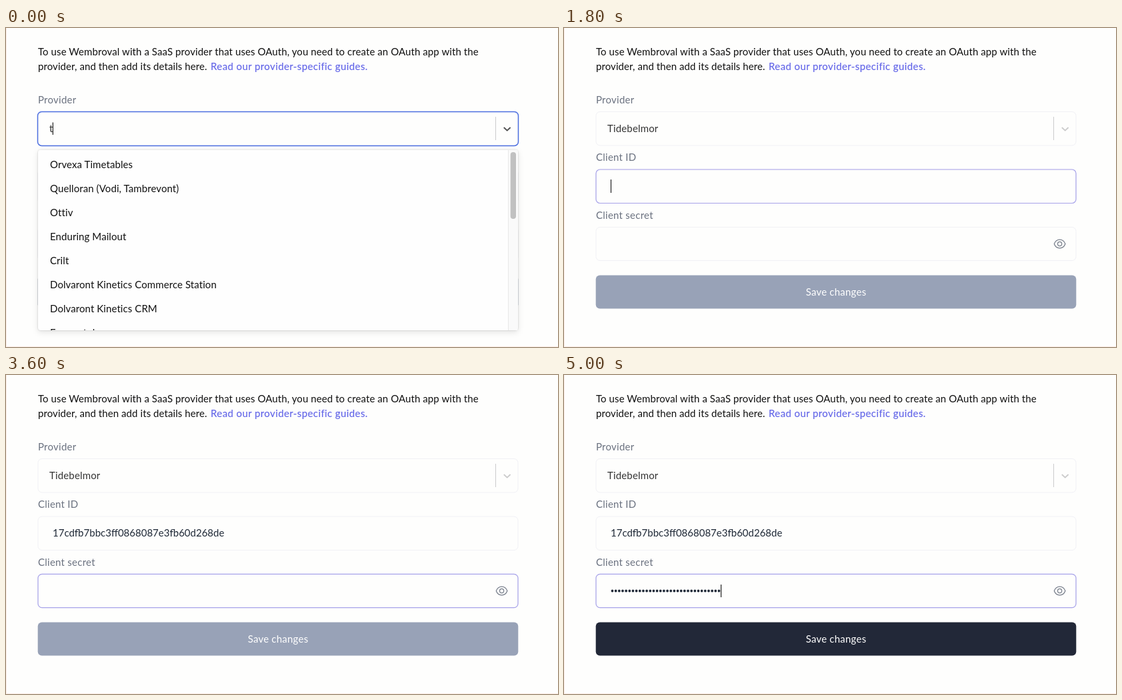
These frames come from a looping animation (828x478 px, 5.2 s). An HTML page:

```html
<!DOCTYPE html>
<html lang="en">
<head>
<meta charset="utf-8">
<title>OAuth app form</title>
<style>
html, body { margin: 0; width: 100%; height: 100%; overflow: hidden; background: #fefefd; }
svg { display: block; width: 828px; height: 478px; }
text { font: 15px Lato, "Open Sans", sans-serif; letter-spacing: .08px; fill: #111; }
.label { fill: #6b7280; letter-spacing: .25px; }
.link { fill: #6366e8; stroke: #6366e8; stroke-width: .15px; letter-spacing: .4px; }
.value { fill: #333; letter-spacing: .15px; }
.id { fill: #1f2937; letter-spacing: 0; }
.save { fill: #fff; letter-spacing: .22px; text-anchor: middle; }
.box { fill: #fefefd; stroke: #f1f1f5; }
.ring { fill: none; stroke: #4d6fe0; stroke-width: 1.5; }
.field { fill: none; stroke: #a7a2ea; stroke-width: 1.2; }
.caret { stroke: #222; stroke-width: 1.2; }
.chevron { fill: none; stroke: #ccc; stroke-width: 1.8; stroke-linecap: round; stroke-linejoin: round; }
.dark { stroke: #555; }
.eye { fill: none; stroke: #747b88; stroke-width: 1.2; }
.menu { fill: #fefefe; filter: drop-shadow(0 0 1px rgba(0,0,0,.2)) drop-shadow(0 3px 4px rgba(0,0,0,.1)); }

/* Each part shows during one window of the 5.2 s loop. */
.typed1, .typed2, .typed3, .chosen, .on-provider, .on-id, .on-secret,
.id-caret, .pasted, .paste-caret, .marked, .secret-caret, .filled, .btn {
  animation: 5.2s step-end infinite;
}
.typed1 { animation-name: typed1; }
.typed2 { animation-name: typed2; }
.typed3 { animation-name: typed3; }
.chosen { animation-name: chosen; }
.on-provider { animation-name: on-provider; }
.on-id { animation-name: on-id; }
.on-secret { animation-name: on-secret; }
.id-caret { animation-name: id-caret; }
.pasted { animation-name: pasted; }
.paste-caret { animation-name: paste-caret; }
.marked { animation-name: marked; }
.secret-caret { animation-name: secret-caret; }
.filled { animation-name: filled; }
.btn { animation-name: btn; }

@keyframes typed1 { 0% { opacity: 1 } 3.846%, to { opacity: 0 } }
@keyframes typed2 { 0% { opacity: 0 } 3.846% { opacity: 1 } 7.692%, to { opacity: 0 } }
@keyframes typed3 { 0% { opacity: 0 } 7.692% { opacity: 1 } 19.23%, to { opacity: 0 } }
@keyframes chosen { 0% { opacity: 0 } 19.23%, to { opacity: 1 } }
@keyframes on-provider { 0% { opacity: 1 } 34.615%, to { opacity: 0 } }
@keyframes on-id { 0% { opacity: 0 } 34.615% { opacity: 1 } 65.384%, to { opacity: 0 } }
@keyframes on-secret { 0% { opacity: 0 } 65.384%, to { opacity: 1 } }
@keyframes id-caret { 0% { opacity: 0 } 34.615% { opacity: 1 } 42.307%, to { opacity: 0 } }
@keyframes pasted { 0% { opacity: 0 } 53.846%, to { opacity: 1 } }
@keyframes paste-caret { 0% { opacity: 0 } 53.846% { opacity: 1 } 57.692%, to { opacity: 0 } }
@keyframes marked { 0% { opacity: 0 } 53.846% { opacity: 1 } 65.384%, to { opacity: 0 } }
@keyframes secret-caret { 0% { opacity: 0 } 65.384% { opacity: 1 } 69.23%, to { opacity: 0 } }
@keyframes filled { 0% { opacity: 0 } 76.923%, to { opacity: 1 } }
@keyframes btn {
  0% { fill: #98a2b7 }
  76.923% { fill: #1f2937 }
  84.615% { fill: #343f4f }
  88.461% { fill: #485566 }
  96.153%, to { fill: #222838 }
}
</style>
</head>
<body>
<svg viewBox="0 0 828 478">
  <defs>
    <clipPath id="list"><rect x="48" y="182" width="720" height="271" rx="4"/></clipPath>
  </defs>
  <path d="M.5 0V477.5H828" fill="none" stroke="#fceee6"/>

  <text x="48" y="41">To use Wembroval with a SaaS provider that uses OAuth, you need to create an OAuth app with the</text>
  <text x="48" y="62.5">provider, and then add its details here.</text>
  <text class="link" x="307" y="62.5">Read our provider-specific guides.</text>

  <text class="label" x="48" y="112.5">Provider</text>
  <rect class="box" x="48" y="125.5" width="720" height="50.5" rx="6"/>
  <path d="M734.5 133V168" stroke="#ccc"/>
  <path class="chevron" d="M747.3 149.5l4.4 4.2 4.4-4.2"/>
  <g class="on-provider">
    <rect class="ring" x="47.5" y="125.4" width="721" height="51" rx="6"/>
    <path class="chevron dark" d="M747.3 149.5l4.4 4.2 4.4-4.2"/>
  </g>
  <text class="value chosen" x="65" y="156">Tidebelmor</text>

  <text class="label" x="48" y="199">Client ID</text>
  <rect class="box" x="48" y="212" width="720" height="50.5" rx="6"/>
  <rect class="field on-id" x="48" y="212" width="720" height="50.5" rx="6"/>
  <path class="caret id-caret" d="M70.5 227V247"/>
  <text class="id pasted" x="70" y="242">17cdfb7bbc3ff0868087e3fb60d268de</text>
  <path class="marked" d="M70 244H327" stroke="#e2566a" stroke-width="1.3" stroke-dasharray="1.5 1.5"/>
  <path class="caret paste-caret" d="M327.8 227V247"/>

  <text class="label" x="48" y="285.5">Client secret</text>
  <rect class="box" x="48" y="298.5" width="720" height="50" rx="6"/>
  <rect class="field on-secret" x="48" y="298.3" width="720" height="50.3" rx="6"/>
  <path class="caret secret-caret" d="M70.5 314V333"/>
  <g class="filled">
    <path d="M72.5 323.5H233" stroke="#1f2937" stroke-width="3.8" stroke-linecap="round" stroke-dasharray="0 5.16"/>
    <path class="caret" d="M235.6 314V333"/>
  </g>
  <g class="eye">
    <path d="M735.3 323.5C738.5 315 748.7 315 751.9 323.5C748.7 332 738.5 332 735.3 323.5Z"/>
    <circle cx="743.6" cy="323.5" r="3.1"/>
  </g>

  <rect class="btn" x="47.7" y="370.5" width="720.6" height="50" rx="6"/>
  <text class="save" x="408" y="401">Save changes</text>

  <g class="typed1">
    <text class="value" x="65" y="156">t</text>
    <path class="caret" d="M70.4 141.5V160"/>
    <rect class="menu" x="48" y="182.5" width="720" height="270.5" rx="4"/>
    <path d="M753.5 183V453H767.5V183Z" fill="#fafafa"/>
    <path d="M753.5 183V453" stroke="#e9e9e9"/>
    <rect x="756.7" y="186" width="8.3" height="100" rx="4.1" fill="#c1c1c1"/>
    <text y="174" clip-path="url(#list)">
      <tspan x="66" dy="36">Orvexa Timetables</tspan>
      <tspan x="66" dy="36">Quelloran (Vodi, Tambrevont)</tspan>
      <tspan x="66" dy="36">Ottiv</tspan>
      <tspan x="66" dy="36">Enduring Mailout</tspan>
      <tspan x="66" dy="36">Crilt</tspan>
      <tspan x="66" dy="36">Dolvaront Kinetics Commerce Station</tspan>
      <tspan x="66" dy="36">Dolvaront Kinetics CRM</tspan>
      <tspan x="66" dy="36">Eroumstol</tspan>
    </text>
  </g>

  <g class="typed2">
    <text class="value" x="65" y="156">ti</text>
    <path class="caret" d="M75 141.5V160"/>
    <rect class="menu" x="48" y="182.5" width="720" height="224.5" rx="4"/>
    <text y="174">
      <tspan x="66" dy="36">Orvexa Timetables</tspan>
      <tspan x="66" dy="36">Ottiv</tspan>
      <tspan x="66" dy="36">Dolvaront Kinetics Commerce Station</tspan>
      <tspan x="66" dy="36">Dolvaront Kinetics CRM</tspan>
      <tspan x="66" dy="36">Lantiquo</tspan>
      <tspan x="66" dy="36">Tidebelmor</tspan>
    </text>
  </g>

  <g class="typed3">
    <text class="value" x="65" y="156">tide</text>
    <path class="caret" d="M92 141.5V160"/>
    <rect class="menu" x="48" y="182.5" width="720" height="44.5" rx="4"/>
    <text x="66" y="210">Tidebelmor</text>
  </g>
</svg>
</body>
</html>
```
